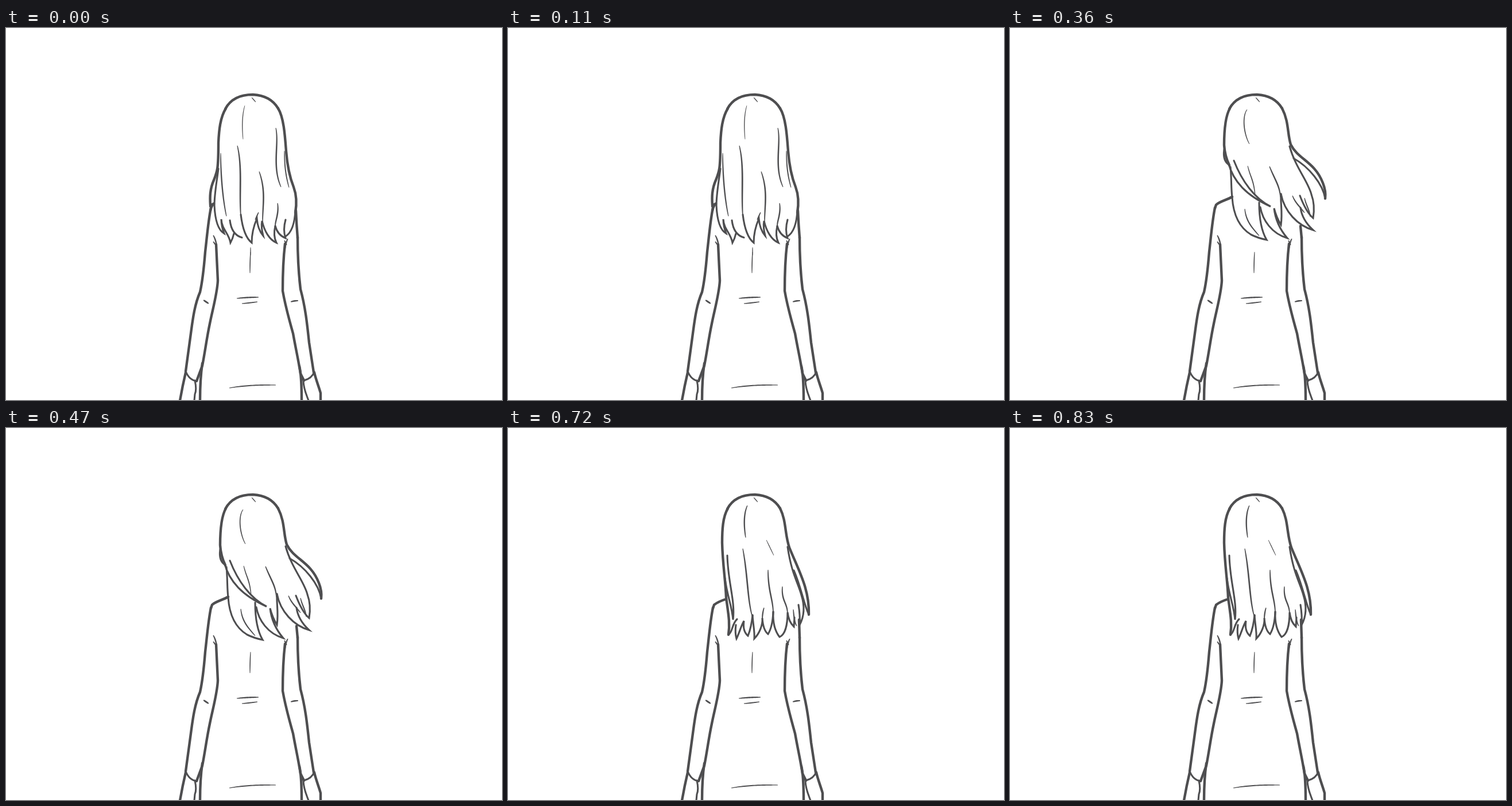
These frames come from a looping animation (864x648 px, 0.9 s). An HTML page:

```html
<!DOCTYPE html>
<html lang="en">
<head>
<meta charset="utf-8">
<title>Hair in the wind</title>
<style>
  html, body { margin: 0; width: 100%; height: 100%; overflow: hidden; background: #fff; }
  svg { display: block; width: 100%; height: 100%; }
  .line { fill: none; stroke: #4e4e50; stroke-linecap: round; stroke-linejoin: miter; stroke-miterlimit: 5; }
  .strand { fill: #4e4e50; }
</style>
</head>
<body>
<svg id="stage" viewBox="0 0 864 648"></svg>
<script>
const NS = 'http://www.w3.org/2000/svg';
const STEP = 180;
const stage = document.getElementById('stage');

function add(parent, tag, attrs = {}) {
  const el = document.createElementNS(NS, tag);
  for (const k in attrs) el.setAttribute(k, attrs[k]);
  return parent.appendChild(el);
}

function line(parent, d, width) {
  add(parent, 'path', { class: 'line', d, 'stroke-width': width });
}

// A pen stroke that thins out towards both ends.
function strand(parent, d, width) {
  const path = add(parent, 'path', { d });
  const len = path.getTotalLength(), n = 28, left = [], right = [];
  for (let i = 0; i <= n; i++) {
    const s = len * i / n;
    const p = path.getPointAtLength(s);
    const a = path.getPointAtLength(Math.max(0, s - 1));
    const b = path.getPointAtLength(Math.min(len, s + 1));
    const r = width / 2 * (0.4 + 0.6 * Math.sqrt(Math.max(0, Math.sin(Math.PI * i / n))));
    const t = Math.atan2(b.y - a.y, b.x - a.x);
    const dx = -Math.sin(t) * r, dy = Math.cos(t) * r;
    left.push(`${(p.x + dx).toFixed(2)} ${(p.y + dy).toFixed(2)}`);
    right.unshift(`${(p.x - dx).toFixed(2)} ${(p.y - dy).toFixed(2)}`);
  }
  path.setAttribute('d', `M${left.concat(right).join('L')}Z`);
  path.setAttribute('class', 'strand');
}

const body = {
  bold: [
    // left arm and hand
    'M357 313C352 338 350 365 347 390C345 415 343 438 338 460C328 483 325 510 322 532L313 598',
    'M366 377C367 400 368 420 369 440C368 462 360 490 355 515C350 538 347 562 342 588L332 615',
    'M313 600C309 617 306 632 303 649', 'M342 584C339 605 338 628 338 649',
    // right arm and hand
    'M508 364C508 397 510 430 513 455C522 488 525 520 528 548L536 600',
    'M486 376C483 402 482 430 482 458C487 487 494 510 500 532C505 560 510 582 513 602L519 614',
    'M537 600C540 613 545 625 548 636V649', 'M511 589C515 606 515 628 515 649',
    // crown
    'M382 141C391 124 408 116 430 116C449 117 465 125 474 140'
  ],
  tips: [
    'M313 598C317 608 324 614 332 615', 'M519 614C527 612 534 607 537 599',
    'M329 614C331 623 332 631 329 638L328 649', 'M518 614C518 628 523 638 527 649'
  ],
  fine: [
    ['M361 361Q366 370 367 381', 2.5], ['M361 372L366 379', 2.2],
    ['M491 367Q487 374 486 386', 2.5], ['M485 370L489 378', 2.2],
    ['M344 474L353 480', 3], ['M496 477Q502 475 509 475', 2.6],
    ['M426 390Q425 408 425 427', 1.7],
    ['M402 471Q420 469 440 469', 2.4], ['M411 480Q424 479 438 477', 2],
    ['M389 627Q425 621 470 622', 2], ['M428 121L435 129', 1.5]
  ]
};

const parting = ['M416 135C411 152 411 174 413 194', 1.4];
const bentParting = ['M413 142C404 154 407 184 417 202', 1.8];
const sideStrand = ['M470 174C476 202 463 241 479 277', 2.6];

// One entry per pose: outline, lock tips, loose strands.
const poses = [
  {
    bold: [
      'M383 140C373 156 371 178 370 200C370 246 368 250 362 265C355 281 355 295 356 309L362 306',
      'M474 140C484 156 486 188 488 215C490 240 495 262 501 277C507 293 506 310 504 322',
      'M362 306Q358 309 356 318', 'M505 318Q506 342 508 366'
    ],
    tips: [
      'M370 245C366 275 363 290 363 309C364 332 368 351 380 358Q375 345 375 333C376 351 388 357 391 374Q395 367 397 358',
      'M390 335C392 352 400 362 411 365',
      'M409 325C412 350 419 367 428 374C428 358 431 346 437 332C438 345 442 355 448 362Q444 347 446 336C450 354 459 369 471 374Q465 362 469 345',
      'M469 345C472 356 479 363 487 366Q482 352 487 334', 'M487 363C498 356 503 338 504 318'
    ],
    fine: [
      parting, sideStrand, ['M403 205C412 243 406 285 409 328', 2.8],
      ['M374 218C374 260 378 300 384 328', 2.4], ['M441 250C453 284 447 308 447 338', 2.6],
      ['M473 305C476 325 468 336 469 348', 2.5], ['M440 321L434 334', 2],
      ['M426 382V396', 1.4], ['M485 214C485 242 488 260 493 278', 2]
    ]
  },
  {
    bold: [
      'M383 140C373 156 371 178 370 200C370 246 369 270 378 294',
      'M474 140C484 156 486 188 488 215C491 240 495 262 503 283C511 304 517 320 516 342',
      'M357 314L359 308Q367 302 379 299', 'M507 338L508 366'
    ],
    tips: [
      'M377 292C384 304 394 312 405 319C391 300 376 275 377 227',
      'M378 297C378 326 385 347 398 358C405 364 412 366 419 371Q411 358 406 349',
      'M416 338C419 354 428 367 437 371Q429 358 428 340C431 360 441 371 455 376Q450 364 449 347C451 357 457 363 466 366Q460 350 461 333',
      'M461 333C465 352 475 367 489 373Q483 364 486 355C488 346 491 338 495 331C499 341 504 346 508 363',
      'M516 342Q507 334 506 321C507 334 511 344 508 363'
    ],
    fine: [
      parting, sideStrand, ['M404 210C416 258 412 302 428 342', 2.7],
      ['M442 249C459 282 452 310 461 336', 2.6], ['M473 298C478 325 484 341 493 347', 2.4],
      ['M394 327C397 342 403 352 410 359', 2.2], ['M449 321V349', 2.2],
      ['M497 307C500 320 506 332 515 339', 2.3], ['M486 213C486 250 495 280 507 318', 2.2]
    ]
  },
  {
    bold: [
      'M383 140C375 154 373 180 373 204C374 220 378 231 382 239',
      'M474 140C486 163 483 184 489 203C502 229 531 233 545 270C549 280 550 289 549 297',
      'M357 314L359 308C365 302 377 300 387 294', 'M506 345L508 366'
    ],
    tips: [
      'M373 212C371 226 375 234 381 238', 'M380 234C389 268 412 292 454 311C426 297 404 267 390 231',
      'M384 242C386 262 385 279 387 295C389 325 400 348 420 360Q432 366 447 369C437 352 434 328 434 304',
      'M436 312C440 335 456 358 483 366C471 352 462 333 460 314Q464 330 472 343C475 321 471 306 472 289',
      'M472 289C478 320 501 344 528 352C516 341 508 328 506 313',
      'M487 206C497 243 520 268 525 290C531 306 530 319 528 331Q516 321 505 292',
      'M549 297C545 272 521 242 494 227'
    ],
    fine: [
      bentParting, ['M414 240C419 261 424 263 427 291', 1.9], ['M452 241C462 266 470 275 471 295', 2.6],
      ['M409 315C411 337 422 348 434 362', 2.2], ['M492 292C497 305 505 311 513 322', 2.3],
      ['M513 296C516 310 522 317 523 329', 2.2]
    ]
  },
  {
    bold: [
      'M383 140C374 155 373 178 373 200C374 234 389 264 401 291C409 311 413 326 413 345Q415 358 413 371',
      'M474 140C485 162 481 185 490 208C506 242 533 270 535 298L532 311',
      'M357 314L359 308C369 302 386 297 401 293', 'M506 327L508 366'
    ],
    tips: [
      'M382 237C401 271 412 294 416 325C423 300 415 268 393 232',
      'M413 371Q425 369 430 360', 'M425 320C426 343 428 360 437 377C446 365 448 350 447 333',
      'M442 318C446 345 455 363 470 364C462 345 460 326 465 310C465 330 470 341 475 349Q479 333 477 314',
      'M477 314C488 331 491 346 488 364C499 361 506 346 509 328',
      'M489 212C497 251 507 258 515 280C523 301 523 326 517 342Q508 335 509 316',
      'M532 311C526 297 523 275 496 235'
    ],
    fine: [
      bentParting, ['M451 195C461 220 469 231 472 254', 1.7], ['M425 228C436 266 433 298 445 324', 2.6],
      ['M457 249C464 281 478 292 478 319', 2.6], ['M493 287C495 306 504 314 508 328', 2.3],
      ['M393 252C404 273 413 293 415 313', 1.9]
    ]
  },
  {
    bold: [
      'M383 140C374 155 373 178 373 200C374 239 379 266 380 296C384 325 387 340 384 360',
      'M474 140C485 162 482 185 490 208C507 250 525 280 524 325',
      'M357 314L359 308Q367 302 380 298', 'M507 334L508 366'
    ],
    tips: [
      'M378 262C381 290 390 309 392 334C396 300 383 269 382 222',
      'M384 360C391 357 390 341 399 333', 'M397 343Q395 356 398 367C403 357 405 347 411 336C409 349 412 357 418 362Q424 347 426 326',
      'M426 326C427 344 430 354 429 367C438 358 444 343 443 331C444 347 448 355 453 359Q461 346 462 320',
      'M462 320C461 341 466 355 473 364C483 360 487 342 487 321Q489 338 498 346L499 330',
      'M487 207C494 254 505 269 511 291C518 313 515 330 508 343Q509 326 506 308',
      'M524 325C515 306 511 278 498 248'
    ],
    fine: [
      ['M417 135C410 150 411 172 414 191', 2.4], ['M450 195L463 222', 1.3],
      ['M409 210C418 259 417 300 426 330', 2.7], ['M453 247C453 286 462 298 462 324', 2.6],
      ['M478 276C476 302 487 304 487 325', 2.5], ['M446 313Q443 323 443 334', 2.3],
      ['M497 316C498 329 499 338 503 345', 2.2]
    ]
  }
];

function draw({ bold, tips, fine }) {
  const g = add(stage, 'g');
  bold.forEach(d => line(g, d, 4.4));
  tips.forEach(d => line(g, d, 3.1));
  fine.forEach(([d, w]) => strand(g, d, w));
  return g;
}

draw(body);
poses.map(draw).forEach((g, i) => {
  const n = poses.length;
  const frames = Array.from({ length: n + 1 }, (_, k) => ({
    offset: k / n, opacity: k % n === i ? 1 : 0, easing: 'steps(1, end)'
  }));
  g.animate(frames, { duration: STEP * n, iterations: Infinity });
});
</script>
</body>
</html>
```
